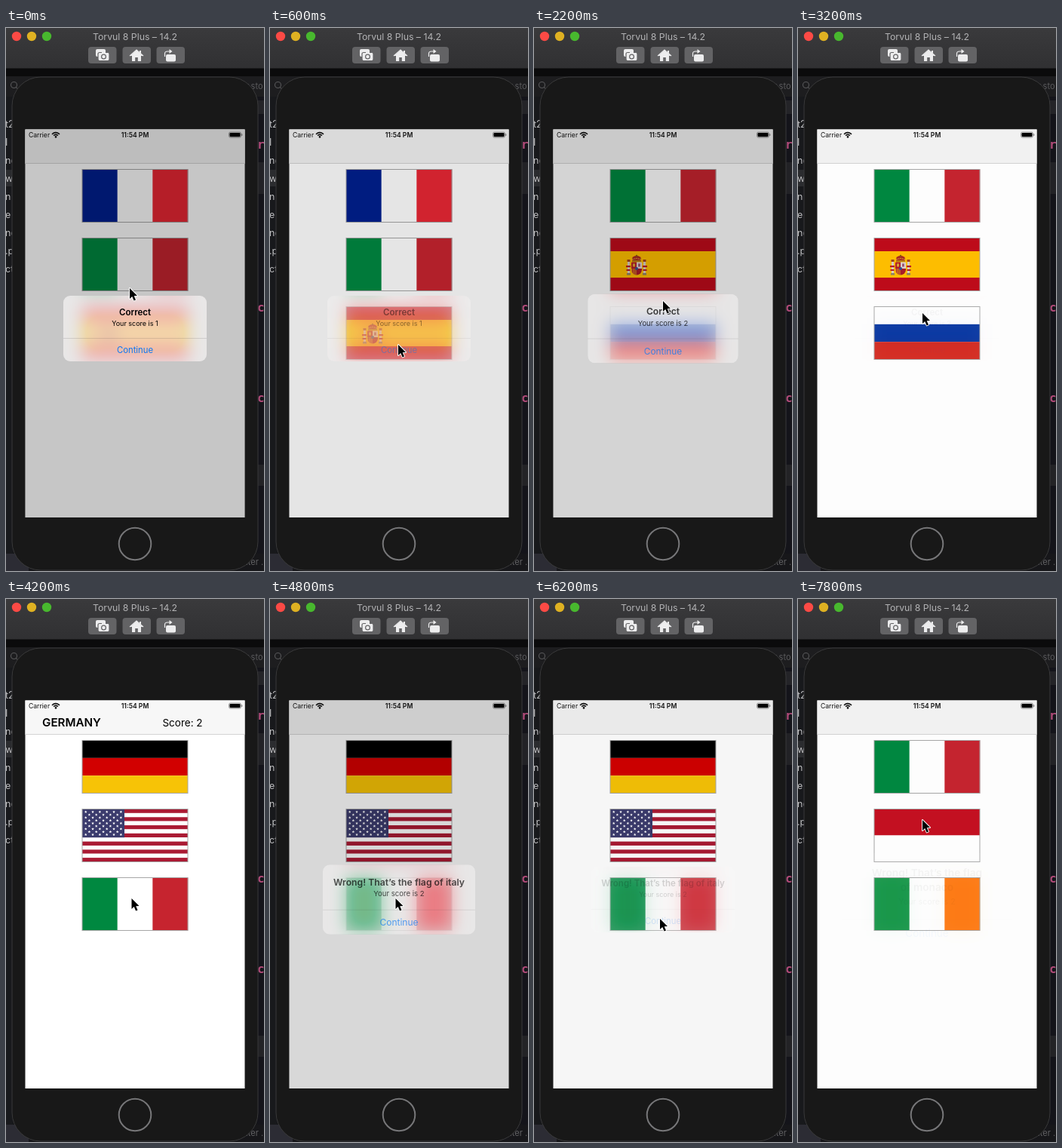
Animation of 342x720 px, one loop 8 s. Source, as an HTML page with a canvas:

```html
<!DOCTYPE html>
<html lang="en">
<head>
<meta charset="utf-8">
<title>Guess the flag</title>
<style>
  html, body { margin: 0; width: 100%; height: 100%; overflow: hidden; background: #101012; }
  canvas { display: block; width: 342px; height: 720px; }
</style>
</head>
<body>
<canvas id="stage" width="342" height="720"></canvas>
<script>
const W = 342, H = 720, LOOP = 8000, STEP = 200;
const SCREEN = { x: 25.5, y: 134.5, w: 291, h: 514.5 };
const ctx = document.getElementById('stage').getContext('2d');

function layer() {
  const c = document.createElement('canvas');
  c.width = W;
  c.height = H;
  return c.getContext('2d');
}

const clamp = v => Math.max(0, Math.min(1, v));
const smooth = u => u * u * (3 - 2 * u);

function rect(g, x, y, w, h, color) {
  g.fillStyle = color;
  g.fillRect(x, y, w, h);
}

function round(g, x, y, w, h, r) {
  g.beginPath();
  g.roundRect(x, y, w, h, r);
}

function disc(g, x, y, r, color) {
  g.fillStyle = color;
  g.beginPath();
  g.arc(x, y, r, 0, Math.PI * 2);
  g.fill();
}

function poly(g, points) {
  g.beginPath();
  points.forEach(([x, y]) => g.lineTo(x, y));
  g.closePath();
}

// y is the middle of the capitals
function text(g, str, x, y, size, color, weight = 400, align = 'center', family = 'Inter, sans-serif') {
  g.font = `${weight} ${size}px ${family}`;
  g.textAlign = align;
  g.fillStyle = color;
  g.fillText(str, x, y + size * 0.36);
}

// Flags, each drawn in a 140 x 70 box at the origin
const vertical = (...colors) => g => colors.forEach((c, i) => rect(g, i * 140 / 3, 0, 140 / 3 + 0.3, 70, c));
const horizontal = (...colors) => g => {
  const h = 70 / colors.length;
  colors.forEach((c, i) => rect(g, 0, i * h, 140, h, c));
};

function arms(g) {
  for (const s of [-1, 1]) {
    rect(g, s * 10.5 - 1.5, -5, 3, 16, '#d8cfc4');
    rect(g, s * 10.5 - 2.5, 10, 5, 2.5, '#8d8069');
    rect(g, s * 10.5 - 2, -8, 4, 3, '#a5441c');
    rect(g, s * 11 - 3, 0, 6, 2.2, '#b81a25');
    rect(g, s * 11 - 2.5, 5, 5, 2, '#b81a25');
  }
  g.fillStyle = '#a92823';
  g.beginPath();
  g.ellipse(0, -9, 6, 4, 0, 0, Math.PI * 2);
  g.fill();
  rect(g, -6, -7, 12, 2.2, '#b77d13');
  disc(g, 0, -13, 1.2, '#8b5a12');
  for (let i = -2; i <= 2; i++) disc(g, i * 2.4, -9.5 + Math.abs(i) * 0.5, 0.8, '#dfae3c');
  g.save();
  round(g, -7, -4.5, 14, 17, [1, 1, 7, 7]);
  g.clip();
  rect(g, -7, -5, 7, 9, '#b51e28');
  rect(g, 0, -5, 7, 9, '#dcd0ce');
  rect(g, -7, 4, 7, 9, '#d08a24');
  rect(g, 0, 4, 7, 9, '#a91c28');
  for (let i = 0; i < 3; i++) rect(g, -6 + i * 2.2, 4, 1, 9, '#b51e28');
  rect(g, -5, -2.5, 3, 4, '#d9a634');
  rect(g, 2.2, -2.5, 2.5, 4, '#94476c');
  disc(g, 0, 4, 2, '#31508d');
  g.restore();
}

const FLAGS = {
  france: vertical('#001f8f', '#fff', '#e92734'),
  italy: vertical('#008840', '#fff', '#c6242f'),
  ireland: vertical('#159447', '#fff', '#ff7710'),
  russia: horizontal('#fff', '#0434a0', '#d3281e'),
  germany: horizontal('#000', '#d20000', '#f7c306'),
  monaco: horizontal('#c51021', '#fff'),
  spain(g) {
    rect(g, 0, 0, 140, 70, '#be0b1a');
    rect(g, 0, 17.5, 140, 35, '#ffbe00');
    g.save();
    g.translate(35, 36.5);
    arms(g);
    g.restore();
  },
  us(g) {
    for (let i = 0; i < 13; i++) rect(g, 0, i * 70 / 13, 140, 70 / 13, i % 2 ? '#fff' : '#aa1a33');
    rect(g, 0, 0, 56, 37.7, '#3b3b6d');
    for (let row = 0; row < 9; row++) {
      const odd = row % 2;
      for (let i = 0; i < 6 - odd; i++) star(g, 4.7 + odd * 4.67 + i * 9.33, 3.8 + row * 3.77, 1.9);
    }
  }
};

function star(g, x, y, r) {
  const points = [];
  for (let i = 0; i < 10; i++) {
    const a = i * Math.PI / 5 - Math.PI / 2, d = i % 2 ? r * 0.45 : r;
    points.push([x + d * Math.cos(a), y + d * Math.sin(a)]);
  }
  g.fillStyle = '#fff';
  poly(g, points);
  g.fill();
}

// Each round lasts until its alert has faded out
const FADE = 300, POP = 400;
const ROUNDS = [
  { flags: ['france', 'italy', 'spain'], title: 'ITALY', score: 0, show: -600, hide: 500, head: ['Correct'], result: 1 },
  { flags: ['italy', 'spain', 'russia'], title: 'SPAIN', score: 1, show: 2000, hide: 2956, head: ['Correct'], result: 2 },
  { flags: ['germany', 'us', 'italy'], title: 'GERMANY', score: 2, show: 4626, hide: 6020, head: ['Wrong! That’s the flag of italy'], result: 2 },
  { flags: ['italy', 'monaco', 'ireland'], title: 'IRELAND', score: 2, show: 7792, hide: 9000, head: ['Wrong! That’s the flag', 'of monaco'], result: 2 }
];

const POINTER = [
  [0, 164, 345], [400, 170, 420], [600, 170, 420], [1200, 172, 312],
  [2000, 172, 312], [2200, 171, 362], [2500, 168, 420], [2900, 168, 420],
  [3200, 165, 378], [3900, 166.5, 397], [4800, 166.5, 397], [5400, 167, 424],
  [6200, 167, 424], [7000, 165, 293], [8000, 165, 293]
];

function pointerAt(t) {
  const i = POINTER.findIndex(p => p[0] > t);
  const a = POINTER[i - 1], b = POINTER[i];
  const u = smooth((t - a[0]) / (b[0] - a[0]));
  return [a[1] + (b[1] - a[1]) * u, a[2] + (b[2] - a[2]) * u];
}

function drawToolbar(g) {
  const shade = g.createLinearGradient(0, 0, 0, 54);
  shade.addColorStop(0, '#3a3a3c');
  shade.addColorStop(1, '#303032');
  rect(g, 0, 0, W, 54, shade);
  rect(g, 0, 53, W, 1, '#1c1c1d');
  disc(g, 14, 11, 6.2, '#fc4a45');
  disc(g, 34, 11, 6.2, '#dfb122');
  disc(g, 54, 11, 6.2, '#48b82e');
  text(g, 'Torvul 8 Plus – 14.2', 171, 12, 12.3, '#b2b2b4');
  for (const x of [109, 154.5, 199.5]) {
    round(g, x, 25, 37.5, 22, 4);
    g.fillStyle = '#636365';
    g.fill();
  }
  const ink = '#ededee';
  g.fillStyle = ink;
  round(g, 119, 28, 13, 10, 2);
  g.fill();
  g.strokeStyle = '#636365';
  g.lineWidth = 1.2;
  round(g, 122, 32.5, 15, 11, 2);
  g.fillStyle = ink;
  g.fill();
  g.stroke();
  rect(g, 127, 31.5, 5, 2, ink);
  g.beginPath();
  g.arc(129.5, 38, 2.9, 0, 7);
  g.stroke();

  g.fillStyle = ink;
  poly(g, [[173, 29.5], [164.5, 37], [167, 37], [167, 44], [171.2, 44], [171.2, 39], [174.8, 39], [174.8, 44], [179, 44], [179, 37], [181.5, 37]]);
  g.fill();
  rect(g, 177, 30, 2, 4, ink);
  g.strokeStyle = ink;
  g.lineWidth = 1.2;
  g.beginPath();
  g.moveTo(164, 37);
  g.lineTo(173, 29);
  g.lineTo(182, 37);
  g.stroke();

  g.fillStyle = ink;
  round(g, 212, 35, 13, 9.5, 2);
  g.fill();
  g.beginPath();
  g.moveTo(210.5, 38);
  g.lineTo(210.5, 34);
  g.quadraticCurveTo(210.5, 31, 214, 31);
  g.lineTo(218, 31);
  g.stroke();
  poly(g, [[216.5, 28], [220.5, 31], [216.5, 34]]);
  g.fill();
}

function drawBackdrop(g) {
  rect(g, 0, 0, W, H, '#151618');
  rect(g, 0, 54, W, 10, '#0b0b0c');
  rect(g, 0, 64, W, 27, '#1d1d1f');
  rect(g, 0, 91, 9, 606, '#18191c');
  rect(g, 333, 91, 9, 606, '#14141a');
  rect(g, 333, 96, 9, 18, '#242428');
  rect(g, 333, 178, 9, 42, '#222226');
  rect(g, 333, 579, 9, 28, '#232326');
  rect(g, 0, 188, 9, 22, '#2b2c2f');
  rect(g, 0, 697, W, 23, '#17171a');
  rect(g, 0, 697, 30, 23, '#2c2c34');
  g.strokeStyle = '#58585a';
  g.lineWidth = 1.1;
  g.beginPath();
  g.arc(10.5, 75.5, 4, 0, 7);
  g.moveTo(13.5, 78.5);
  g.lineTo(16.5, 82);
  g.stroke();
  text(g, 'r.sto', 318, 77, 11, '#5a5a5c', 400, 'left');
  text(g, 'lter .', 318, 708, 11, '#626264', 400, 'left');
  ['t2', 'I', 'ne', 'w', 'n', 'e', 'nc', '.p', 'ct'].forEach((s, i) =>
    text(g, s, -1, 127.5 + i * 24, 12.5, '#bdbdbf', 400, 'left'));
  [['r', 154], ['c', 370], ['c', 490]].forEach(([s, y]) =>
    text(g, s, 333, y, 16, '#b04a78', 700, 'left', '"DejaVu Sans Mono", monospace'));

  round(g, 8, 65, 326, 654, 38);
  g.fillStyle = '#181818';
  g.fill();
  g.strokeStyle = '#39393a';
  g.lineWidth = 1;
  g.stroke();
  g.strokeStyle = '#777779';
  g.lineWidth = 2;
  g.beginPath();
  g.arc(171, 684, 21.3, 0, 7);
  g.stroke();
  drawToolbar(g);
}

function drawStatus(g) {
  text(g, 'Carrier', 30, 142, 8.6, '#111', 400, 'left');
  text(g, '11:54 PM', 171, 142, 8.6, '#111', 600);
  g.strokeStyle = '#111';
  g.lineWidth = 1.6;
  for (const r of [3.6, 6.4]) {
    g.beginPath();
    g.arc(66, 145, r, -Math.PI * 0.78, -Math.PI * 0.22);
    g.stroke();
  }
  disc(g, 66, 144.4, 1.3, '#111');
  g.lineWidth = 0.7;
  g.strokeStyle = '#777';
  round(g, 295.5, 138, 16, 7.2, 2);
  g.stroke();
  g.fillStyle = '#000';
  round(g, 296.5, 139, 14, 5.2, 1.2);
  g.fill();
  rect(g, 312.3, 140.3, 1, 2.6, '#777');
}

function drawScene(g, game, busy, dim) {
  const { x, y, w, h } = SCREEN;
  rect(g, x, y, w, h, '#fff');
  rect(g, x, y, w, 45, busy ? '#f3f3f3' : '#f7f7f7');
  rect(g, x, 179, w, 1, '#d4d4d4');
  drawStatus(g);
  if (!busy) {
    text(g, game.title, 87, 164, 15.2, '#000', 600);
    text(g, 'Score: ' + game.score, 234, 164, 13.5, '#000');
  }
  game.flags.forEach((name, i) => {
    g.save();
    g.translate(101, 187.5 + i * 91);
    FLAGS[name](g);
    g.strokeStyle = '#a6a6a6';
    g.lineWidth = 1;
    g.strokeRect(0, 0, 140, 70);
    g.restore();
  });
  rect(g, x, y, w, h, `rgba(0,0,0,${0.225 * dim})`);
}

function drawAlert(game, alpha, scale) {
  const extra = (game.head.length - 1) * 17;
  const w = 190, h = 87 + extra, top = -h / 2, bottom = h / 2;
  const cy = 398.5 + extra / 34;
  ctx.save();
  ctx.globalAlpha = alpha;
  ctx.translate(171, cy);
  ctx.scale(scale, scale);

  ctx.save();
  round(ctx, -w / 2, top, w, h, 9);
  ctx.clip();
  ctx.save();
  ctx.scale(1 / scale, 1 / scale);
  ctx.filter = 'blur(11px) saturate(1.7)';
  ctx.drawImage(scene.canvas, -171, -cy);
  ctx.restore();
  rect(ctx, -w / 2, top, w, h, 'rgba(250,248,248,0.68)');
  ctx.restore();

  rect(ctx, -w / 2, bottom - 31, w, 0.8, 'rgba(60,60,67,0.2)');
  game.head.forEach((line, i) => text(ctx, line, 0, top + 22 + i * 16, 11.5, '#000', 600));
  text(ctx, 'Your score is ' + game.result, 0, bottom - 50.5, 9, '#000');
  text(ctx, 'Continue', 0, bottom - 15, 11.3, '#0a78f5');
  ctx.restore();
}

function drawPointer(x, y) {
  ctx.save();
  ctx.translate(x, y);
  poly(ctx, [[0, 0], [0, 14], [3.2, 11], [5.6, 16.5], [8, 15.4], [5.7, 10.2], [10, 10]]);
  ctx.lineJoin = 'round';
  ctx.strokeStyle = '#fff';
  ctx.lineWidth = 1.8;
  ctx.stroke();
  ctx.fillStyle = '#000';
  ctx.fill();
  ctx.restore();
}

const backdrop = layer(), scene = layer();
drawBackdrop(backdrop);

function render(t) {
  const game = ROUNDS.find(r => t < r.hide + FADE);
  const busy = t >= game.show;
  const leaving = t >= game.hide;
  const shown = 1 - (1 - clamp((t - game.show) / POP)) ** 2;
  const left = (1 - clamp((t - game.hide) / FADE)) ** 2;
  const alpha = leaving ? left : shown;

  scene.clearRect(0, 0, W, H);
  drawScene(scene, game, busy, alpha);
  ctx.drawImage(backdrop.canvas, 0, 0);
  ctx.drawImage(scene.canvas, 0, 0);
  if (alpha > 0) drawAlert(game, alpha, 1.2 - 0.2 * shown);
  drawPointer(...pointerAt(t));
}

const start = performance.now();
function tick() {
  const t = (performance.now() - start) % LOOP;
  render(Math.floor(t / STEP) * STEP);
  requestAnimationFrame(tick);
}
tick();
</script>
</body>
</html>
```
